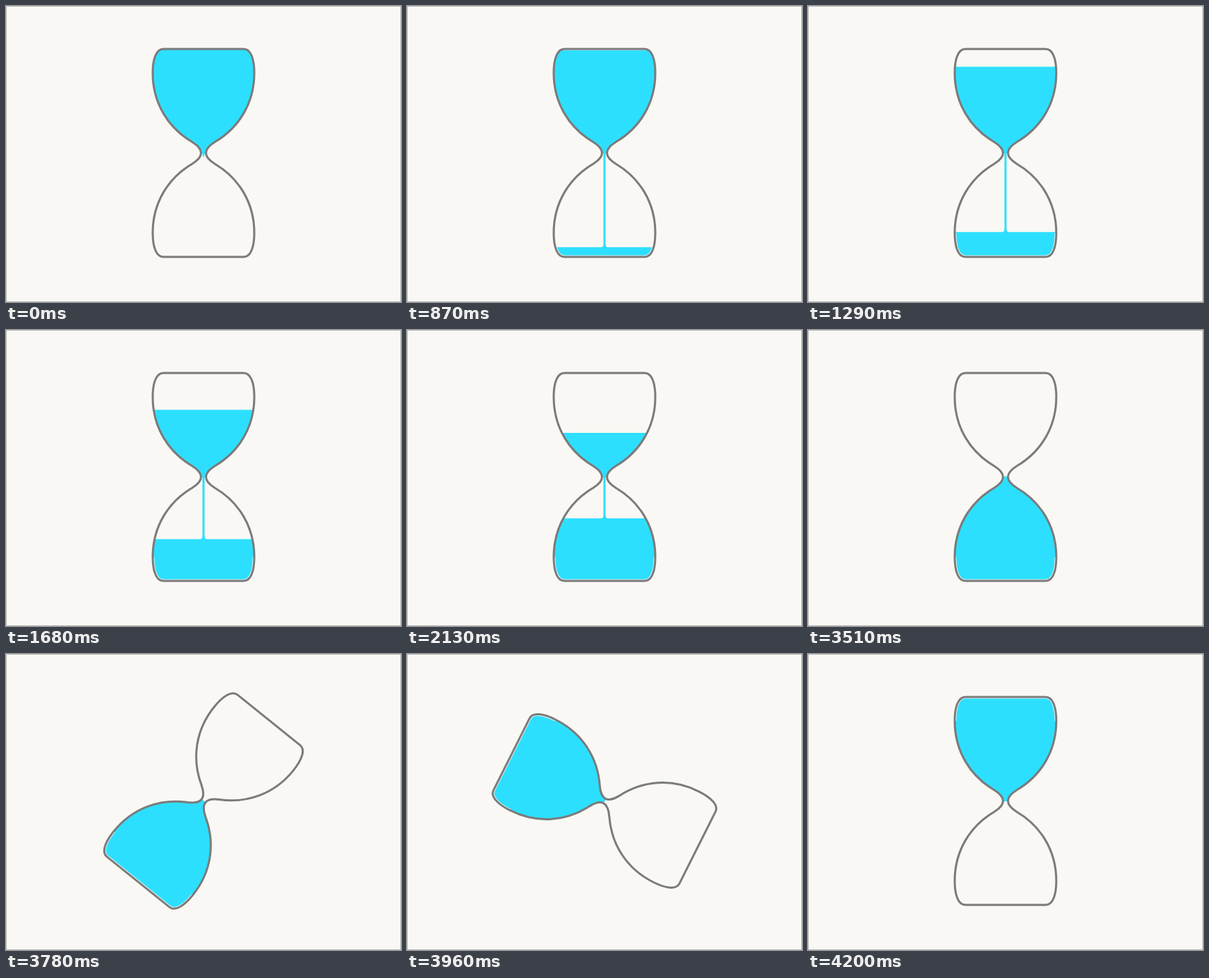
An HTML page that plays this animation: 560 by 420 pixels, repeating every 4.47 s.

```html
<!DOCTYPE html>
<html lang="en">
<head>
<meta charset="utf-8">
<title>Hourglass</title>
<style>
  html, body { margin: 0; width: 100%; height: 100%; overflow: hidden; background: #f9f8f4; }
  svg { display: block; width: 100vw; height: 100vh; }
</style>
</head>
<body>
<svg viewBox="0 0 560 420">
  <defs>
    <path id="outline" d="M-57-147.5H57C67-147.5 72-133.5 72-113.5C72-70.5 50-35.5 16-15.5
      C8-10.5 3.5-5.5 3.5 0C3.5 5.5 8 10.5 16 15.5C50 35.5 72 70.5 72 113.5
      C72 133.5 67 147.5 57 147.5H-57C-67 147.5-72 133.5-72 113.5C-72 70.5-50 35.5-16 15.5
      C-8 10.5-3.5 5.5-3.5 0C-3.5-5.5-8-10.5-16-15.5C-50-35.5-72-70.5-72-113.5
      C-72-133.5-67-147.5-57-147.5Z"/>
    <clipPath id="inside"><use href="#outline"/></clipPath>
  </defs>
  <rect width="560" height="420" fill="#f9f8f4"/>
  <rect x=".5" y=".5" width="559" height="419" fill="none" stroke="#b9b8b5"/>
  <g id="glass">
    <g clip-path="url(#inside)" fill="#2ddfff">
      <path id="upper"/>
      <path id="stream"/>
      <path id="lower"/>
    </g>
    <path d="M-72 113.5C-72 133.5-67 147.5-57 147.5H57C67 147.5 72 133.5 72 113.5"
      fill="none" stroke="#f9f8f4" stroke-width="4.6"/>
    <use href="#outline" fill="none" stroke="#7b7b7b" stroke-width="3"/>
  </g>
</svg>
<script>
  const LOOP = 4470, STEP = 30;
  const FALL_END = 480, FLOW_START = 180, FLOW_END = 3600, TURN_END = 4200;
  const part = id => document.getElementById(id);
  const draw = (id, d) => part(id).setAttribute('d', d);
  const mix = (a, b, k) => a + (b - a) * k;

  // Smooth ease in and out between two times.
  function ease(t, start, end) {
    const u = Math.min(1, Math.max(0, (t - start) / (end - start)));
    return u * u * (3 - 2 * u);
  }

  function streamPath(t, level) {
    if (t >= FLOW_END) return '';
    const head = mix(7, 149, ease(t, 0, FALL_END));
    if (t < FALL_END) return `M-2-1H2L1.5 ${head - 5}L0 ${head}L-1.5 ${head - 5}Z`;
    return `M-1.5-1H1.5V${Math.max(0, level)}H-1.5Z`;
  }

  // Lower liquid, with a small flare where the stream meets the surface.
  function lowerPath(t, level) {
    const flare = t < FALL_END ? 0 : Math.min(4, Math.max(0, level));
    return `M-80 ${level}H-5Q-1.5 ${level} -1.5 ${level - flare}
      H1.5Q1.5 ${level} 5 ${level}H80V160H-80Z`;
  }

  function render(t) {
    const flow = ease(t, FLOW_START, FLOW_END);
    const top = mix(-163.5, 3.5, flow);
    const level = mix(149.5, -0.5, flow);
    draw('upper', top < 0.5 ? `M-80 ${top}H80V.5H-80Z` : '');
    draw('stream', streamPath(t, level));
    draw('lower', lowerPath(t, level));
    const angle = 180 * ease(t, FLOW_END, TURN_END);
    part('glass').setAttribute('transform', `translate(280 208.5) rotate(${angle})`);
  }

  const begin = performance.now();
  function tick() {
    const t = (performance.now() - begin) % LOOP;
    render(Math.floor(t / STEP) * STEP);
    requestAnimationFrame(tick);
  }
  tick();
</script>
</body>
</html>
```
